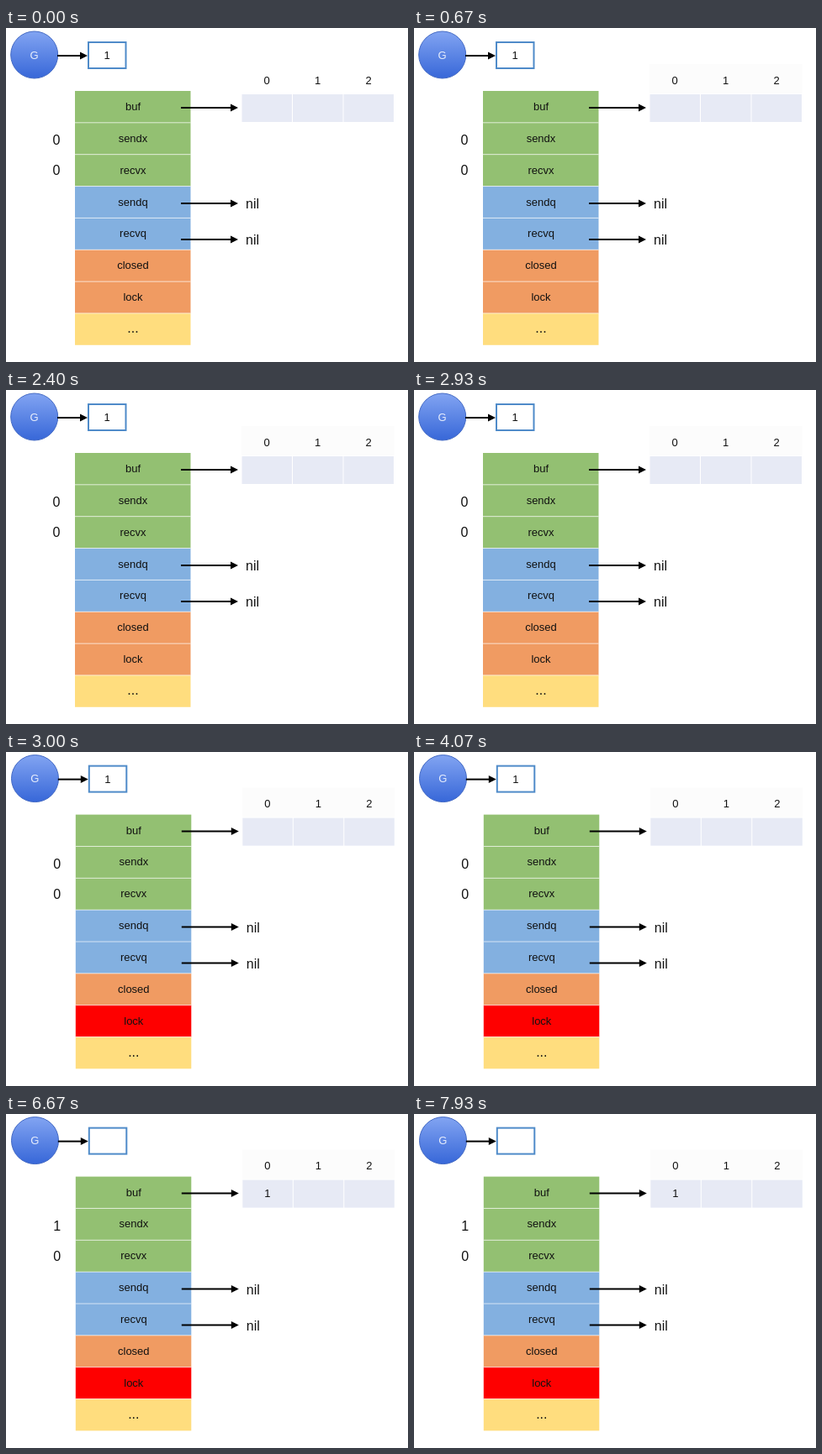
These frames come from a looping animation (478x398 px, 8000 ms). An HTML page:

```html
<!DOCTYPE html>
<html lang="en">
<head>
<meta charset="utf-8">
<title>Channel send</title>
<style>
  html, body { margin: 0; width: 100%; height: 100%; overflow: hidden; background: #fff; }
  svg { display: block; width: 478px; height: 398px; }
  text { font: 13px "Liberation Sans", Arial, sans-serif; text-anchor: middle; fill: #111; }
  .big { font-size: 16px; }
</style>
</head>
<body>
<svg viewBox="0 0 478 398">
  <defs>
    <linearGradient id="ball" x1="0" y1="0" x2="0" y2="1">
      <stop offset="0" stop-color="#82a4f2"/>
      <stop offset="1" stop-color="#3767d8"/>
    </linearGradient>
  </defs>
  <g id="scene"></g>
</svg>
<script>
const LOOP = 8000;
const HEADER_AT = 70, LOCK_AT = 3000, SEND_AT = 5835;
const GREEN = '#93c072', BLUE = '#83b0e0', ORANGE = '#f09b62', YELLOW = '#ffdd7e';
const ROW_TOP = 75, ROW_HEIGHT = 37.85;
const scene = document.getElementById('scene');

function add(tag, attrs, text = '') {
  const el = document.createElementNS('http://www.w3.org/2000/svg', tag);
  for (const [name, value] of Object.entries(attrs)) el.setAttribute(name, value);
  el.textContent = text;
  return scene.appendChild(el);
}
const rect = (x, y, width, height, fill) => add('rect', { x, y, width, height, fill });
const label = (x, y, text, cls = '') => add('text', { x, y, class: cls }, text);

function arrow(x1, x2, y) {
  add('path', { d: `M${x1} ${y}H${x2 - 7}`, stroke: '#000', 'stroke-width': 2 });
  add('path', { d: `M${x2} ${y}l-9 -4.5v9z` });
}

// Goroutine and its value
add('circle', { cx: 33.7, cy: 32, r: 28, fill: 'url(#ball)', stroke: '#4269c4' });
label(33.5, 36.5, 'G').style.fill = '#e8eefc';
arrow(61, 97, 33);
add('rect', { x: 98, y: 17, width: 44.5, height: 31, fill: '#fff', stroke: '#4f8bc9', 'stroke-width': 2 });
const value = label(120, 37, '1');

// Channel fields
const fields = [
  ['buf', GREEN], ['sendx', GREEN], ['recvx', GREEN], ['sendq', BLUE],
  ['recvq', BLUE], ['closed', ORANGE], ['lock', ORANGE], ['...', YELLOW]
];
const rows = fields.map(([name, color], i) => {
  const y = ROW_TOP + i * ROW_HEIGHT;
  const row = rect(82, y, 137.5, ROW_HEIGHT, color);
  if (i) add('path', { d: `M82 ${y}h137.5`, stroke: '#fff', 'stroke-opacity': 0.65 });
  label(151, y + 23, name, name === '...' ? 'big' : '');
  return row;
});
const sendIndex = label(60, 139, '0', 'big');
label(60, 175, '0', 'big');

// Ring buffer and wait queues
const header = rect(280, 43, 181.5, 35, '#fcfcfc');
for (let i = 0; i < 3; i++) {
  rect(280.5 + i * 60.5, 79, 59.5, 33, '#e7eaf5');
  label(310 + i * 60.5, 66.5, i);
}
const slot = label(310, 99.5, '1');
arrow(208, 276, 95);
for (const y of [209, 252]) {
  arrow(208, 276, y);
  label(293, y + 6, 'nil', 'big');
}

function show(el, visible) {
  el.setAttribute('visibility', visible ? 'visible' : 'hidden');
}

function draw(t) {
  const locked = t >= LOCK_AT, sent = t >= SEND_AT;
  scene.setAttribute('transform', locked ? 'translate(0.8 -0.4)' : 'translate(0 0)');
  rows[6].setAttribute('fill', locked ? '#fe0000' : ORANGE);
  show(header, t >= HEADER_AT);
  show(value, !sent);
  show(slot, sent);
  sendIndex.textContent = sent ? '1' : '0';
}

const start = performance.now();
function tick() {
  draw((performance.now() - start) % LOOP);
  requestAnimationFrame(tick);
}
tick();
</script>
</body>
</html>
```
